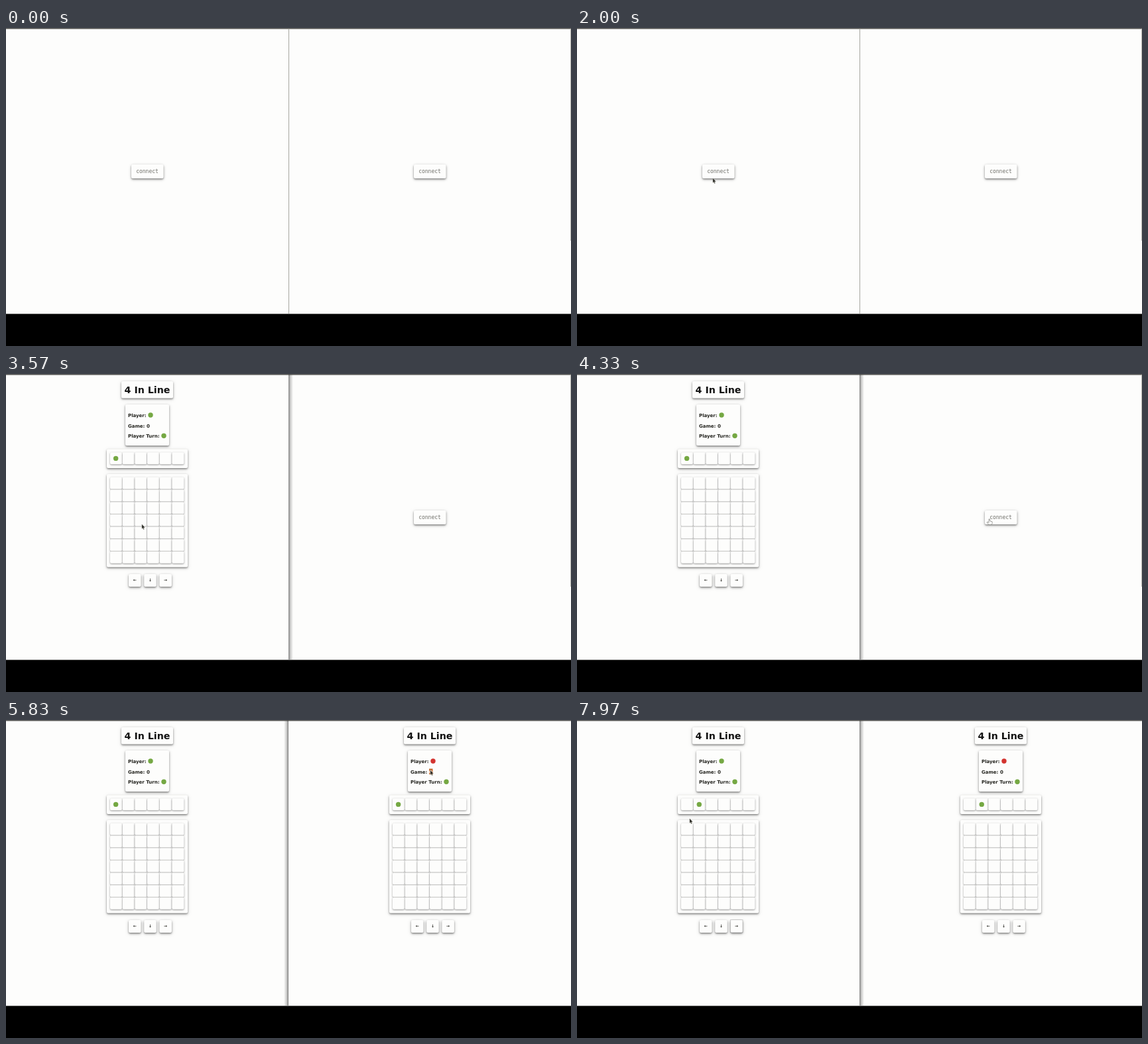
An HTML page with a canvas for the animation above (8 s loop, 852 by 480 pixels).

```html
<!DOCTYPE html>
<html lang="en">
<head>
<meta charset="utf-8">
<title>4 In Line</title>
<style>
  html, body { margin: 0; width: 100%; height: 100%; overflow: hidden; background: #000; }
  canvas { display: block; }
</style>
</head>
<body>
<canvas id="stage" width="852" height="480"></canvas>
<script>
const ctx = document.getElementById('stage').getContext('2d');
const LOOP = 8000, TRAVEL = 500;
const HALF = 426, CENTER = 213, PITCH = 18.67;
const PAPER = '#fdfdfc', INK = '#24241f', GREEN = '#75a843', RED = '#d3332f';
const SANS = '"DejaVu Sans", sans-serif', MONO = '"DejaVu Sans Mono", monospace';

const LEFT_JOIN = 2550, RIGHT_JOIN = 4600, SELECT = 5750, BLUR = 6400, MOVE = 7400;

// Places the pointer visits: arrival time, x, y
const VISITS = [
  [0, 858, 6], [800, 742, 400], [1130, -1, 146], [1950, 205, 227], [4250, 621, 219],
  [4900, 616, 223], [5600, 640, 76], [6550, 178, 144], [7250, 239, 312], [7950, 170, 149]
];

// Rests at each place, then travels along an arc that grows with the sideways distance
function pointerAt(t) {
  const next = VISITS.findIndex(visit => visit[0] > t);
  if (next < 0) {
    const [, x, y] = VISITS.at(-1);
    return { x, y };
  }
  const [left, x0, y0] = VISITS[next - 1], [arrive, x1, y1] = VISITS[next];
  const start = Math.max(left, arrive - TRAVEL);
  const u = Math.max(0, (t - start) / (arrive - start));
  const ease = u * u * (3 - 2 * u);
  const lift = Math.abs(x1 - x0) / 4 * Math.sin(Math.PI * ease);
  return { x: x0 + (x1 - x0) * ease, y: y0 + (y1 - y0) * ease - lift };
}

function rect(x, y, w, h, color) {
  ctx.fillStyle = color;
  ctx.fillRect(x, y, w, h);
}

function box(x, y, w, h, alpha, blur, drop) {
  ctx.save();
  ctx.shadowColor = `rgba(0,0,0,${alpha})`;
  ctx.shadowBlur = blur;
  ctx.shadowOffsetY = drop;
  ctx.fillStyle = PAPER;
  ctx.beginPath();
  ctx.roundRect(x, y, w, h, 2);
  ctx.fill();
  ctx.restore();
}

function card(x, y, w, h) {
  box(x, y, w, h, .2, 5, 1.5);
  box(x, y, w, h, .4, 2.5, 1.5);
}

function text(str, x, y, font, color = INK, align = 'left') {
  ctx.font = font;
  ctx.fillStyle = color;
  ctx.textAlign = align;
  ctx.fillText(str, x, y);
}

function dot(x, y, color) {
  ctx.fillStyle = color;
  ctx.beginPath();
  ctx.arc(x, y, 3.7, 0, 7);
  ctx.fill();
}

function lobby() {
  card(189, 206, 48.5, 21);
  text('connect', CENTER, 219, '8px ' + MONO, '#70706a', 'center');
}

function cells(y, rows) {
  card(152, y, 122, rows * PITCH + 9.8);
  for (let row = 0; row < rows; row++) {
    for (let col = 0; col < 6; col++) {
      box(157 + col * PITCH, y + 4.8 + row * PITCH, 18, 18, .42, 2.5, 1);
    }
  }
}

function game(player, column, selected, focused) {
  const label = 'bold 7px ' + SANS;
  card(174, 11, 78, 25.5);
  text('4 In Line', CENTER, 29, 'bold 14.2px ' + SANS, '#111', 'center');

  card(180, 46, 66, 62);
  text('Player:', 184, 65, label);
  dot(218, 62, player);
  text('Game:', 184, 80.5, label);
  if (selected) rect(212, 73.5, 5.5, 8.5, '#c4682c');
  text('0', 212, 80.5, label, selected ? '#fff' : INK);
  text('Player Turn:', 184, 96, label);
  dot(238, 93.2, GREEN);

  cells(113.5, 1);
  cells(151, 7);
  dot(165.6 + column * PITCH, 127.4, GREEN);

  ['←', '↓', '→'].forEach((arrow, i) => {
    const x = 185 + i * 23.2;
    card(x, 302, 18.5, 19);
    if (focused && i === 2) {
      ctx.strokeStyle = 'rgba(0,0,0,.15)';
      ctx.lineWidth = 1;
      ctx.strokeRect(x, 301.5, 18.5, 19);
    }
    text(arrow, x + 9.2, 313.2, 'bold 6px ' + SANS, INK, 'center');
  });
}

// side: 1 casts the shadow to the right, -1 to the left, 0 draws a plain line
function divider(side) {
  if (!side) return rect(HALF, 1, 1, 430, '#a6a6a0');
  const glow = ctx.createLinearGradient(HALF, 0, HALF + side * 7, 0);
  glow.addColorStop(0, 'rgba(0,0,0,.5)');
  glow.addColorStop(.4, 'rgba(0,0,0,.2)');
  glow.addColorStop(1, 'rgba(0,0,0,0)');
  rect(side > 0 ? HALF : HALF - 7, 1, 7, 430, glow);
}

function pointer({ x, y }, hand) {
  const outline = hand
    ? 'M0 0h1.5l.2 3 3.3.7.2 2.8L4 8.5H0L-3 5l1-1 2 1.5Z'
    : 'M0 0v6.3l1.4-1.1.9 2.4.9-.4-.9-2.3 1.9-.2Z';
  const path = new Path2D(outline);
  ctx.save();
  ctx.translate(x, y);
  ctx.fillStyle = hand ? '#fff' : '#1c1c18';
  ctx.strokeStyle = hand ? '#66665e' : '#88887e';
  ctx.lineWidth = .6;
  ctx.fill(path);
  ctx.stroke(path);
  ctx.restore();
}

function overButton({ x, y }, t) {
  const joined = t >= (x < HALF ? LEFT_JOIN : RIGHT_JOIN);
  const [halfWidth, top] = joined ? [33, 302] : [24, 206];
  return Math.abs(x % HALF - CENTER) < halfWidth && y > top && y < top + 21;
}

function focusSide(t) {
  if (t < LEFT_JOIN) return 0;
  if (t < RIGHT_JOIN) return 1;
  if (t < BLUR) return -1;
  return t < MOVE ? 0 : 1;
}

function draw(t) {
  rect(0, 0, 852, 480, '#000');
  rect(0, 0, 852, 431.5, PAPER);
  rect(0, 0, 852, 1.5, '#555552');

  const column = t < MOVE ? 0 : 1;
  if (t < LEFT_JOIN) lobby();
  else game(GREEN, column, false, column > 0);

  ctx.save();
  ctx.translate(HALF, 0);
  if (t < RIGHT_JOIN) {
    lobby();
    rect(HALF - 1, 1, 1, 320, '#b8b8b2');
  } else {
    game(RED, column, t >= SELECT && t < MOVE, false);
  }
  ctx.restore();

  divider(focusSide(t));
  const at = pointerAt(t);
  pointer(at, overButton(at, t));
}

function tick() {
  draw(performance.now() % LOOP);
  requestAnimationFrame(tick);
}
tick();
</script>
</body>
</html>
```
